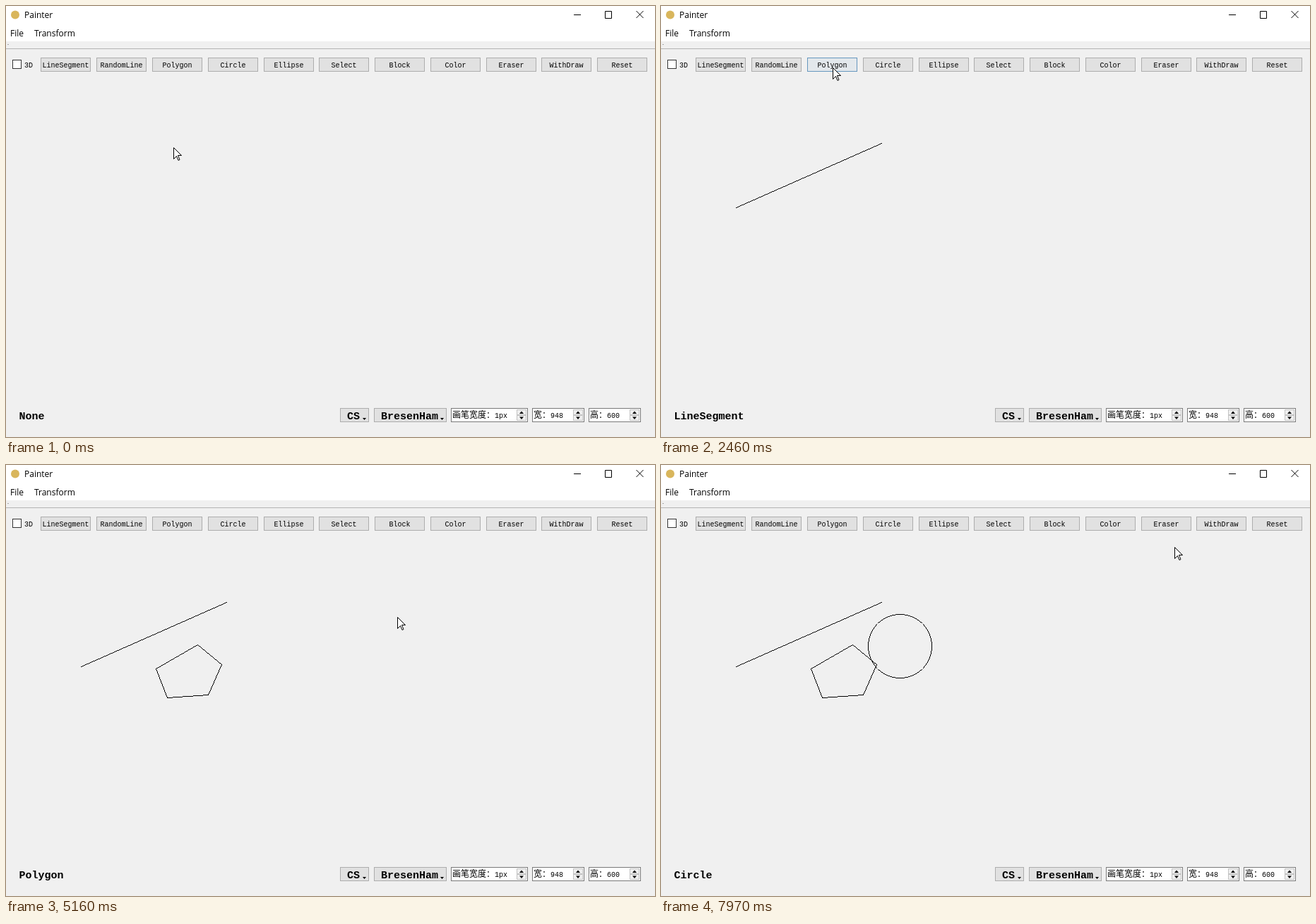
Animation, 919 px wide and 610 px high, one loop 7.99 s. Source, as an HTML page:

```html
<!DOCTYPE html>
<html lang="zh-CN">
<head>
<meta charset="utf-8">
<title>Painter</title>
<style>
  html, body { margin: 0; width: 100%; height: 100%; overflow: hidden; background: #f0f0f0; }
  svg { display: block; width: 100%; height: 100%; }
  text { fill: #000; white-space: pre; }
  .ui { font: 12px "Open Sans", "Noto Sans", sans-serif; }
  .mono { font: 10px "Liberation Mono", "DejaVu Sans Mono", monospace; }
  .bold { font: bold 15px "Liberation Mono", "DejaVu Sans Mono", monospace; }
  .cjk { font: 12px "Noto Sans CJK SC", "Noto Sans CJK", sans-serif; }
  .crisp { shape-rendering: crispEdges; }
</style>
</head>
<body>
<svg id="stage" viewBox="0 0 919 610" xmlns="http://www.w3.org/2000/svg"></svg>
<script>
const LOOP = 7990;
const stage = document.getElementById('stage');

function add(tag, attrs, content) {
  const node = document.createElementNS('http://www.w3.org/2000/svg', tag);
  set(node, attrs);
  if (content) node.textContent = content;
  stage.appendChild(node);
  return node;
}
function set(node, attrs) {
  for (const key in attrs) node.setAttribute(key, attrs[key]);
}
const text = (x, y, cls, content, anchor = 'start') =>
  add('text', { x, y, class: cls, 'text-anchor': anchor }, content);
const fillRect = (x, y, width, height, fill) => add('rect', { x, y, width, height, fill });
const box = (x, y, width, height, fill, stroke) =>
  add('rect', { x: x + .5, y: y + .5, width, height, fill, stroke });
const outline = d => add('path', { d, fill: 'none', stroke: '#000' });
const solid = d => add('path', { d, class: 'crisp' });

// Window frame and menu
fillRect(0, 0, 919, 50, '#fff');
fillRect(0, 60, 919, 1, '#b4b4b4');
fillRect(2, 54, 2, 1, '#a8a8a8');
add('circle', { cx: 13, cy: 12.5, r: 6, fill: '#d9b65c' });
text(26, 17, 'ui', 'Painter');
text(6, 43, 'ui', 'File');
text(40, 43, 'ui', 'Transform');
outline('M804 12.5h10');
outline('M848.5 7.5h9v10h-9z');
outline('M892.5 7l10 10m0 -10l-10 10');

// Tool row
const tools = ['LineSegment', 'RandomLine', 'Polygon', 'Circle', 'Ellipse', 'Select',
  'Block', 'Color', 'Eraser', 'WithDraw', 'Reset'];
const buttons = {};
box(9, 76, 12, 12, '#fff', '#333');
text(26, 87, 'mono', '3D');
tools.forEach((name, i) => {
  const x = Math.round(49.35 + 78.79 * i);
  buttons[name] = box(x, 73, 70, 19, '#e1e1e1', '#adadad');
  text(x + 35.5, 87, 'mono', name, 'middle');
});

// Bottom row
function dropButton(x, width, label) {
  box(x, 569, width, 19, '#e1e1e1', '#adadad');
  text(x + 10, 585, 'bold', label);
  add('path', { d: `M${x + width - 8} 583h5l-2.5 3z` });
}
function spinBox(x, width, label, value) {
  box(x, 569, width, 19, '#fff', '#7a7a7a');
  text(x + 2, 583, 'cjk', label);
  text(x + 2 + 12 * label.length, 583, 'mono', value);
  const left = x + width - 15;
  for (const y of [571, 579]) box(left, y, 13, 7, '#f0f0f0', '#c4c4c4');
  add('path', { d: `M${left + 4} 577h6l-3 -3.5zM${left + 4} 581.5h6l-3 3.5z` });
}
dropButton(473, 40, 'CS');
dropButton(521, 102, 'BresenHam');
spinBox(630, 108, '画笔宽度：', '1px');
spinBox(745, 73, '宽：', '948');
spinBox(825, 73, '高：', '600');
const status = text(18.5, 585, 'bold', 'None');

// Pixel-wise drawing
const dot = (x, y) => `M${Math.round(x)} ${Math.round(y)}h1v1h-1z`;
function linePixels([x0, y0], [x1, y1]) {
  const steps = Math.max(Math.abs(x1 - x0), Math.abs(y1 - y0), 1);
  let d = '';
  for (let i = 0; i <= steps; i++) d += dot(x0 + (x1 - x0) * i / steps, y0 + (y1 - y0) * i / steps);
  return d;
}
function circlePixels([cx, cy], r) {
  let d = '';
  for (let a = 0; a <= r * Math.SQRT1_2; a++) {
    const b = Math.sqrt(r * r - a * a);
    for (const sx of [-1, 1]) for (const sy of [-1, 1])
      d += dot(cx + sx * a, cy + sy * b) + dot(cx + sx * b, cy + sy * a);
  }
  return d;
}

const lineStart = [106, 285], lineEnd = [312, 194];
const corners = [[271, 254], [305, 282], [286, 325], [228, 329], [212, 288]];
const center = [338, 256], rim = [373, 284];
const LINE_DOWN = 1420, CIRCLE_DOWN = 6660;
const CORNER_START = 3090, CORNER_STEP = 380;

// The pointer's route: a list of eased moves
const moves = [];
const go = (start, length, to) => moves.push({ start, length, to });

// A visit to a tool button: hover, press, release, leave
const visits = [];
function pick(name, start, length, point, click, leave) {
  go(start, length, point);
  visits.push({ name, arrive: start + length, click, leave });
}

pick('LineSegment', 160, 480, [84, 87], 800, 960);
go(960, 400, lineStart);
go(LINE_DOWN, 380, lineEnd);
pick('Polygon', 1950, 500, [243, 88], 2580, 2650);
go(2650, 260, corners[0]);
corners.slice(1).forEach((corner, i) => go(CORNER_START + CORNER_STEP * i, 230, corner));
go(4700, 450, [555, 216]);
go(5150, 330, [390, 182]);
pick('Circle', 5480, 490, [330, 85], 6020, 6290);
go(6290, 310, center);
go(CIRCLE_DOWN, 290, rim);
go(7470, 500, [727, 117]);

const ramp = (t, start, length) => Math.min(1, Math.max(0, (t - start) / length));
const smooth = u => u * u * (3 - 2 * u);
const mix = (a, b, u) => a.map((v, i) => Math.round(v + (b[i] - v) * u));

function pointerAt(t) {
  return moves.reduce((at, m) => mix(at, m.to, smooth(ramp(t, m.start, m.length))), [237, 201]);
}

// Button colours for rest, hover and pressed
const fills = [[225, 225, 225], [229, 241, 251], [204, 228, 247]];
const borders = [[173, 173, 173], [0, 120, 215], [0, 84, 153]];
const shade = (colors, hover, press) =>
  `rgb(${mix(colors[0], mix(colors[1], colors[2], press), hover)})`;

const segment = solid(''), polygon = solid(''), circle = solid('');
const pointer = add('path', {
  d: 'M.5 .5V16.5L4.5 12.5L7 18.5L9 17.5L6.5 11.5H11.5Z', fill: '#fff', stroke: '#000'
});

function render(t) {
  const at = pointerAt(t);
  // The arrow image sits one pixel above its hot spot
  set(pointer, { transform: `translate(${at[0]} ${at[1] - 1})` });

  let mode = 'None';
  for (const { name, arrive, click, leave } of visits) {
    const hover = ramp(t, arrive - 30, 100) - ramp(t, leave, 120);
    const press = ramp(t, click, 50) - ramp(t, click + 80, 100);
    set(buttons[name], { fill: shade(fills, hover, press), stroke: shade(borders, hover, press) });
    if (t >= click + 70) mode = name;
  }
  status.textContent = mode;

  set(segment, { d: t < LINE_DOWN ? '' : linePixels(lineStart, t < 1800 ? at : lineEnd) });

  const sides = Math.floor((t - CORNER_START) / CORNER_STEP);
  set(polygon, {
    d: corners.map((c, i) => i < sides ? linePixels(c, corners[(i + 1) % corners.length]) : '').join('')
  });

  const reach = t < 7000 ? at : rim;
  const radius = Math.round(Math.hypot(reach[0] - center[0], reach[1] - center[1]));
  set(circle, { d: t < CIRCLE_DOWN ? '' : circlePixels(center, radius) });
}

const start = performance.now();
function tick() {
  render((performance.now() - start) % LOOP);
  requestAnimationFrame(tick);
}
tick();
</script>
</body>
</html>
```
